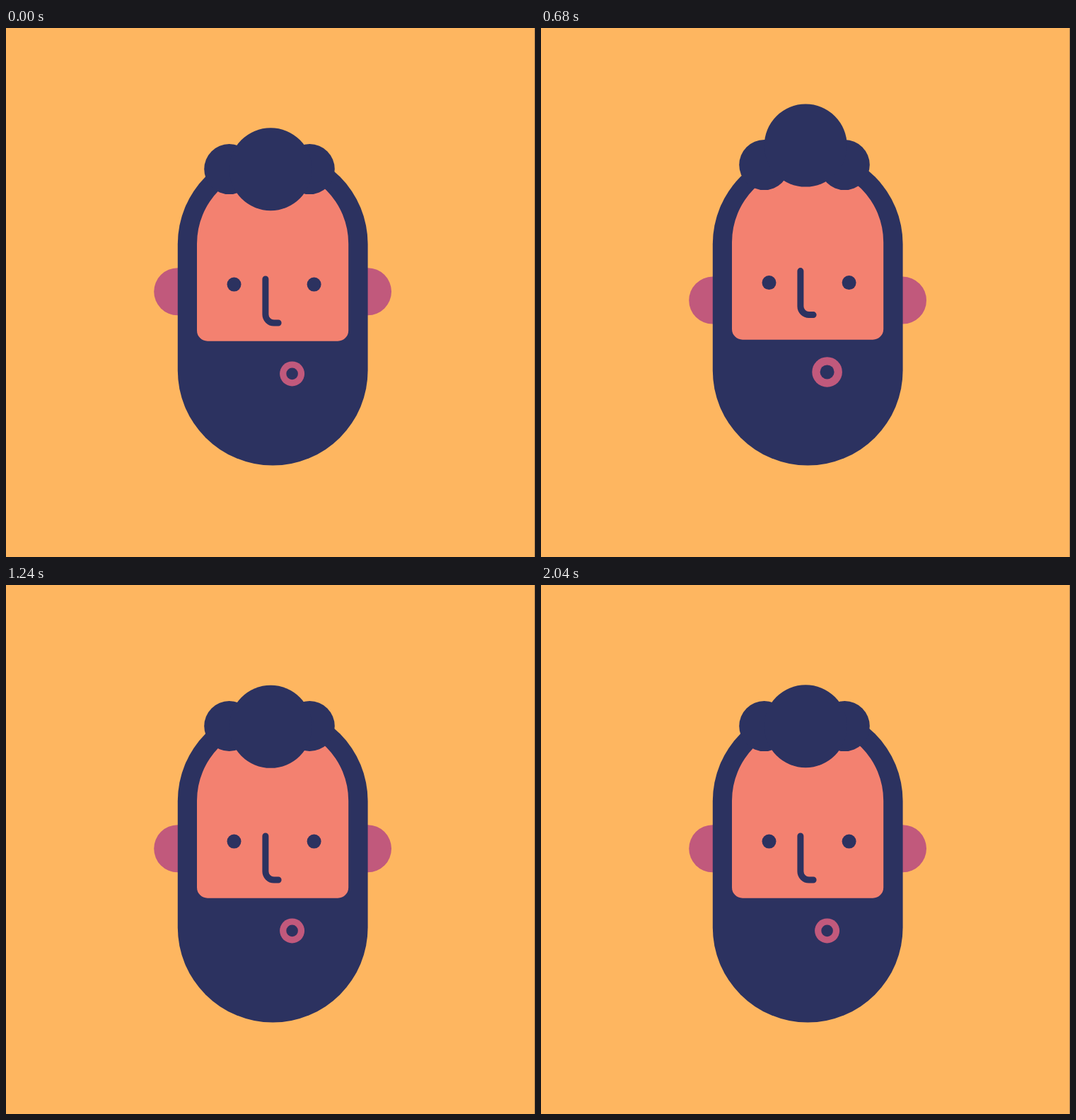
Write an HTML page that moves like this. It is 748 by 748 pixels and loops after 2.08 s.

```html
<!DOCTYPE html>
<html lang="en">
<head>
<meta charset="utf-8">
<title>Bearded face</title>
<style>
  html, body { margin: 0; width: 100%; height: 100%; overflow: hidden; background: #feb660; }
  svg { display: block; width: 100vw; height: 100vh; }
  .navy { fill: #2c3260; }
  .skin { fill: #f38170; }
  .pink { fill: #c1597c; }
  .line { fill: none; stroke: #2c3260; stroke-width: 9; stroke-linecap: round; }
</style>
</head>
<body>
<svg viewBox="0 0 748 748">
  <rect width="748" height="748" fill="#feb660"/>
  <rect x="747" width="1" height="748" fill="#c08c52"/>
  <g id="ears" class="pink">
    <circle cx="242.7" cy="372.7" r="33.5"/>
    <circle cx="511.5" cy="372.7" r="33.5"/>
  </g>
  <rect class="navy" x="242.8" y="171" width="268.8" height="447.6" rx="134.4"/>
  <path id="face" class="skin" d="M270 305a107.1 107.1 0 0 1 214.2 0V427.7a15 15 0 0 1 -15 15H285a15 15 0 0 1 -15 -15z"/>
  <g id="eyes" class="navy">
    <circle cx="322.5" cy="362.6" r="10"/>
    <circle cx="435.6" cy="362.6" r="10"/>
  </g>
  <path id="nose" class="line" d="M366.9 355V405a12 12 0 0 0 12 12h6.2"/>
  <g id="mouth">
    <circle id="lips" class="pink" cx="404.6" cy="488.9" r="17.5"/>
    <circle id="hole" class="navy" cx="404.6" cy="488.9" r="8.3"/>
  </g>
  <g id="curls" class="navy">
    <circle cx="315.7" cy="199.6" r="35.5"/>
    <circle cx="429.3" cy="199.6" r="35.5"/>
  </g>
  <circle id="bun" class="navy" cx="374.2" cy="199.7" r="58.5"/>
</svg>
<script>
  const LOOP = 2080, STEP = 40, MOVE = 240;
  const el = id => document.getElementById(id);

  // id, vertical travel, start of lift, start of return, settles with a bounce
  const parts = [
    ["face", -25, 40, 488, false],
    ["eyes", -37.7, 38, 484, false],
    ["mouth", -35, 39, 485, false],
    ["nose", -43.5, 49, 527, false],
    ["ears", 24, 65, 562, true],
    ["curls", -11.6, 66, 562, true],
    ["bun", -33.6, 98, 690, true]
  ];

  function ease(ms) {
    const u = Math.min(1, Math.max(0, ms / MOVE));
    return u < 0.5 ? 2 * u * u : 1 - 2 * (1 - u) ** 2;
  }

  function bounce(ms) {
    return ms < 0 ? 0 : 0.17 * Math.sin(Math.PI * ms / 400) * Math.exp(-ms / 180);
  }

  function lift(t, up, down, springy) {
    const base = ease(t - up) - ease(t - down);
    return springy ? base - bounce(t - down - MOVE) : base;
  }

  function draw(t) {
    for (const [id, travel, up, down, springy] of parts) {
      const y = travel * lift(t, up, down, springy);
      el(id).setAttribute("transform", `translate(0 ${y.toFixed(2)})`);
    }
    const open = lift(t, 150, 680, false);
    el("lips").setAttribute("r", 17.5 + 3.8 * open);
    el("hole").setAttribute("r", 8.3 + 1.7 * open);
  }

  const start = performance.now();
  function tick() {
    const t = (performance.now() - start) % LOOP;
    draw(Math.floor(t / STEP) * STEP);
    requestAnimationFrame(tick);
  }
  tick();
</script>
</body>
</html>
```
